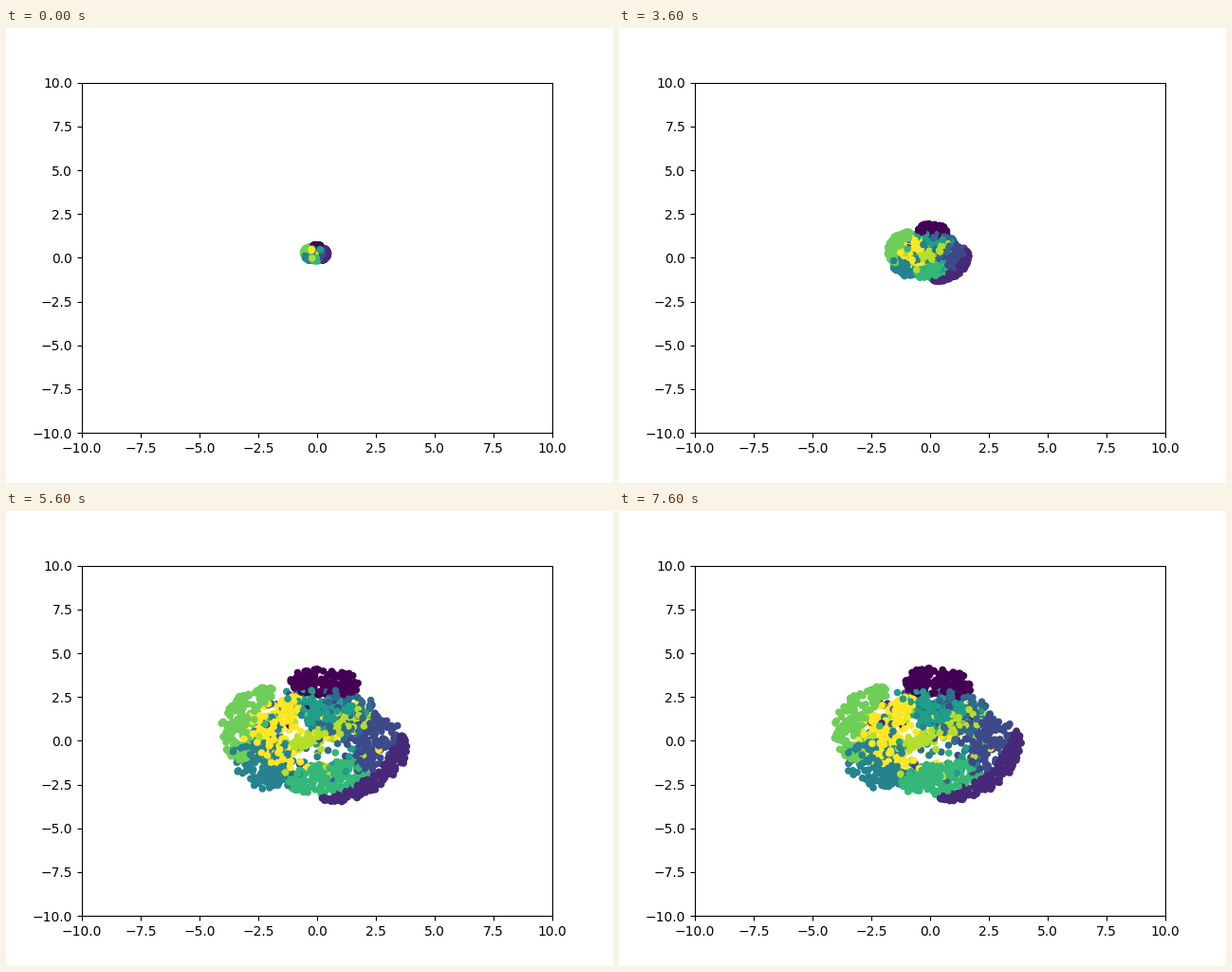
These frames come from a looping animation (640 by 480 pixels, 8 s). A matplotlib script:

```python
import numpy as np
import matplotlib.pyplot as plt
from matplotlib.animation import FuncAnimation

FRAMES, INTERVAL = 20, 400
CENTER = np.array([-0.06, 0.24])
RADII = np.array([3.95, 3.84])
PER_CLASS = 179

# One rounded ring sector per class: angles in degrees, radii relative to the cloud.
SECTORS = np.array([
    [58, 108, 0.60, 1.01], [-86, 2, 0.84, 1.02], [-42, 27, 0.42, 0.87],
    [8, 80, 0.10, 0.76], [188, 242, 0.38, 0.98], [42, 115, 0.18, 0.70],
    [245, 320, 0.42, 0.88], [124, 204, 0.70, 1.02], [18, 46, -0.30, 0.74],
    [112, 236, 0.34, 0.74]])

rng = np.random.default_rng(4)
labels = np.tile(np.arange(10), PER_CLASS)
count = len(labels)
on_rim = np.isin(labels, (0, 1, 6, 7))

along, across = rng.uniform(-1, 1, (2, count))
across *= np.sqrt(1 - np.abs(along) ** 3)
first, last, inner, outer = SECTORS[labels].T
angle = (first + last) / 2 + along * (last - first) / 2
radius = (inner + outer) / 2 + across * (outer - inner) / 2

# Some points sit among other classes, mostly those of the inner classes.
stray = rng.random(count) < np.where(on_rim, 0.012, 0.15)
angle = np.where(stray, rng.uniform(0, 360, count), angle)
radius = np.where(stray, 0.72 * np.sqrt(rng.random(count)), radius)

spread = np.where(on_rim, 0.008, 0.045)[:, None]
jitter = np.clip(rng.normal(size=(count, 2)), -2, 2) * spread
phase = rng.uniform(0, 2 * np.pi, (count, 2))


def positions(frame):
    # The tight cloud opens at once, holds, then bursts past its final size.
    scale = np.interp(frame, [0, 1, 9, 10, 11, 12], [0.13, 0.42, 0.435, 1, 1.14, 1])
    # Class 1 slides along the rim.
    slide = np.interp(frame, [3, 5, 12, 19], [32, 8, -2, 2])
    theta = np.radians(angle + np.where((labels == 1) & ~stray, slide, 0))
    unit = radius[:, None] * np.column_stack([np.cos(theta), np.sin(theta)])
    wander = 0.012 * np.cos(phase + 0.6 * frame)
    return CENTER + RADII * scale * (unit + jitter + wander)


fig, ax = plt.subplots(figsize=(6.4, 4.8), dpi=100)
ax.set(xlim=(-10, 10), ylim=(-10, 10))
scatter = ax.scatter(*positions(0).T, c=labels, s=20, cmap="viridis")


def update(frame):
    scatter.set_offsets(positions(frame))
    return scatter,


animation = FuncAnimation(fig, update, frames=FRAMES, interval=INTERVAL,
                          repeat=True, repeat_delay=0)
plt.show()
```
